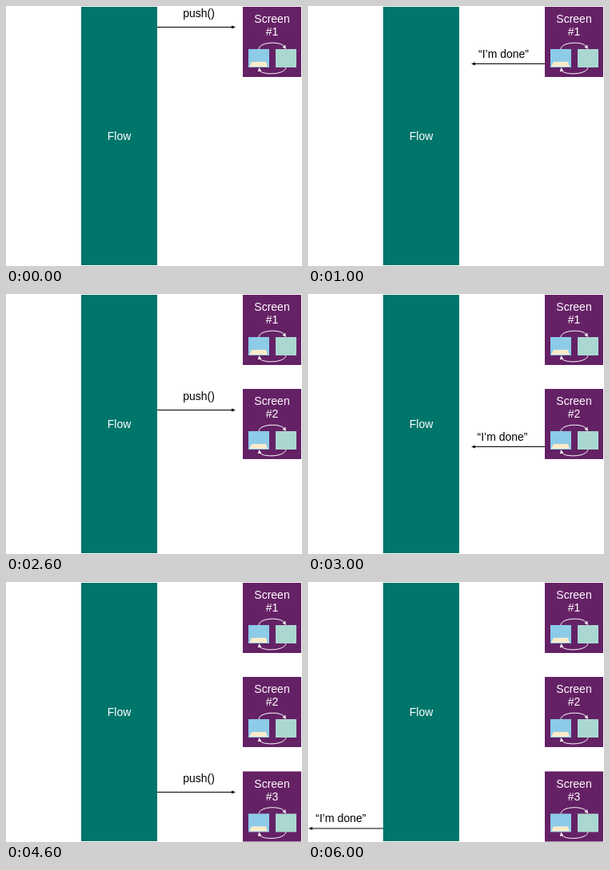
These frames come from a looping animation (370x326 px, 7000 ms). An HTML page:

```html
<!DOCTYPE html>
<html lang="en">
<head>
<meta charset="utf-8">
<title>Flow and screens</title>
<style>
  html, body { margin: 0; width: 100%; height: 100%; overflow: hidden; background: #fff; }
  svg { display: block; width: 370px; height: 326px; }
  text { font: 14px "Liberation Sans", Arial, sans-serif; text-anchor: middle; }
</style>
</head>
<body>
<svg viewBox="0 0 370 326">
  <defs>
    <g id="screen">
      <path fill="#652165" d="M296 1h73v88h-73z"/>
      <path fill="#8dcbe8" d="M303 54h26v23h-26z"/>
      <path fill="#fdebcb" d="M307 70h18l2 6h-23z"/>
      <path fill="#aad7d0" d="M337 54h26v23h-26z"/>
      <path fill="none" stroke="#fff" d="M316 54C317 44.500 344 44 348 51M350 77C348 87 320 86.500 317.500 81"/>
      <path fill="#fff" d="M350 54l-4.500-2.500 3.700-2.700zM316.300 77l3 4.600-4.400.6z"/>
    </g>
  </defs>
  <path fill="#00756a" d="M94 1h95v324h-95z"/>
  <text x="141.500" y="168" fill="#fff">Flow</text>
  <g id="screens"></g>
  <g id="message">
    <path id="line" stroke="#000"/>
    <path id="head"/>
    <text id="label"></text>
  </g>
</svg>
<script>
const STEP = 1000;
const tops = [0, 118, 236.5];
const get = id => document.getElementById(id);

// Each step: label, label centre, baseline, arrow start, arrow tip, arrow height.
const push = y => ["push()", 241, y - 13, 189, 287, y];
const done = (y, from = 296, to = 204, center = 243) =>
  ["“I’m done”", center, y - 8, from, to, y];
const steps = [
  push(26.5), done(72.5, 296, 204, 244.5),
  push(145.5), done(191.5),
  push(263.5), done(309),
  done(309, 94, 0.5, 41)
];

get("screens").innerHTML = tops.map((top, i) => `
  <g transform="translate(0 ${top})">
    <use href="#screen"/>
    <text x="332.500" y="21" fill="#fff">Screen</text>
    <text x="332.500" y="37" fill="#fff">#${i + 1}</text>
  </g>`).join("");
const screens = [...get("screens").children];

let shown = -1;
function draw(now) {
  const step = Math.floor(now / STEP) % steps.length;
  if (step !== shown) {
    shown = step;
    const [text, x, base, from, to, y] = steps[step];
    const back = 5 * Math.sign(from - to);
    get("label").textContent = text;
    get("label").setAttribute("x", x);
    get("label").setAttribute("y", base);
    get("line").setAttribute("d", `M${from} ${y}H${to + back}`);
    get("head").setAttribute("d", `M${to} ${y}l${back} -2v4z`);
    screens.forEach((screen, i) => {
      screen.style.display = i <= step / 2 ? "" : "none";
    });
  }
  requestAnimationFrame(draw);
}
draw(performance.now());
</script>
</body>
</html>
```
